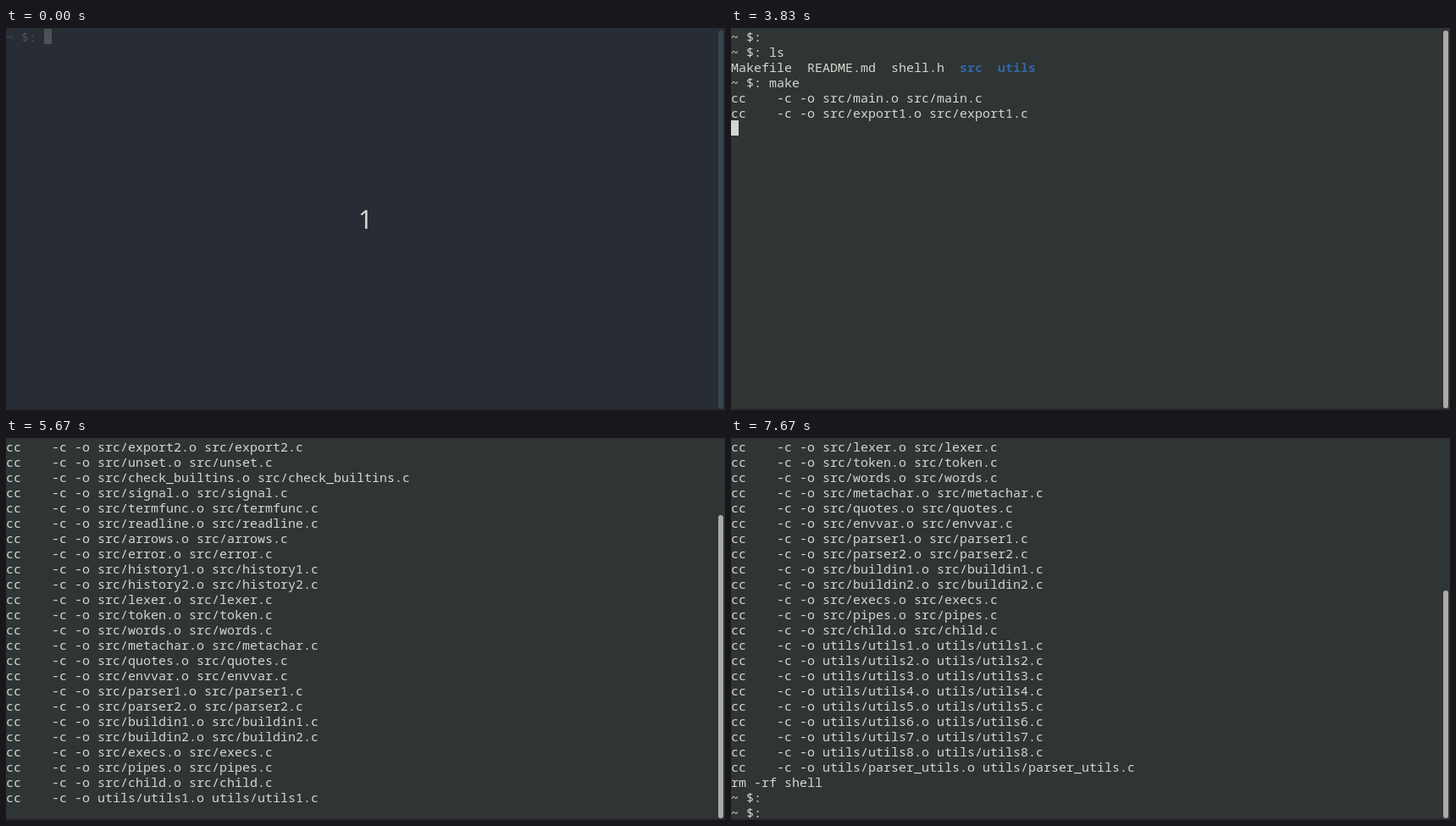
Animation of 849 by 451 pixels, one loop 8 s. Source, as an HTML page:

```html
<!DOCTYPE html>
<html lang="en">
<head>
<meta charset="utf-8">
<title>Terminal: building a shell</title>
<style>
  html, body { margin: 0; width: 100%; height: 100%; overflow: hidden; }
  body {
    --bg: #2e3534; --fg: #d3d7cf; --bar: #aaaaa8;
    position: relative;
    background: linear-gradient(#2c2b2e, #2c2b2e) 0 449px / 100% 2px no-repeat var(--bg);
  }
  body.dim { --bg: #282c34; --fg: #4d5155; --bar: #38464f; }
  #text {
    position: absolute; left: 0; top: 1px; margin: 0;
    font: 15px/18px "Noto Sans Mono", monospace;
    font-variant-ligatures: none;
    color: var(--fg);
  }
  #text b { color: #3465a4; }
  #cursor { position: absolute; left: 0; top: 1px; width: 9px; height: 18px; background: var(--fg); }
  #bar { position: absolute; left: 841px; bottom: 2px; width: 6px; border-radius: 3px; background: var(--bar); }
  #count {
    position: absolute; left: 0; top: 205px; width: 849px;
    font: 30px/41px "Noto Sans", sans-serif;
    text-align: center; color: #d3d7cf; visibility: hidden;
  }
  .dim #count { visibility: visible; }
</style>
</head>
<body class="dim">
<pre id="text"></pre>
<div id="cursor"></div>
<div id="bar"></div>
<div id="count">1</div>
<script>
const LOOP = 8000, ROWS = 25, COL = 9, ROW = 18;
const PROMPT = "~ $: ";
const $ = id => document.getElementById(id);

const files = [
  ..."main export1 export2 unset check_builtins signal termfunc readline arrows error history1 history2 lexer token words metachar quotes envvar parser1 parser2 buildin1 buildin2 execs pipes child"
    .split(" ").map(n => "src/" + n),
  ...Array.from({ length: 8 }, (_, i) => "utils/utils" + (i + 1)),
  "utils/parser_utils"
];

// Terminal output: [time, appended text]
const log = [
  [0, PROMPT],
  [670, "\n"],
  [830, PROMPT],
  [1330, "ls"],
  [1500, "\nMakefile  README.md  shell.h  <b>src</b>  <b>utils</b>\n" + PROMPT],
  [2500, "mak"],
  [2670, "e"],
  [3670, "\n"]
];

// Compiler progress: [time, files done]
let done = 0;
for (const [time, count] of [
  [3830, 2], [4000, 4], [4170, 6], [4330, 9], [4500, 11], [4670, 12],
  [4830, 15], [5000, 18], [5170, 21], [5330, 23], [5500, 24], [5670, 26],
  [5830, 28], [6000, 30], [6170, 33], [6330, 34]
]) {
  const lines = files.slice(done, count).map(f => `cc    -c -o ${f}.o ${f}.c\n`);
  log.push([time, lines.join("")]);
  done = count;
}
log.push([6330, "rm -rf shell\n"], [6500, PROMPT], [7500, "\n" + PROMPT]);

const within = (t, a, b) => t >= a && t < b;
const cursorOff = [[3170, 3670], [4170, 4670], [5500, 6170], [6500, 6670], [7170, 7500], [7670, LOOP]];

let shown = "";
function draw() {
  const t = performance.now() % LOOP;
  const lines = log.filter(e => e[0] <= t).map(e => e[1]).join("").split("\n");
  const view = lines.slice(-ROWS);
  const html = view.join("\n");
  if (html !== shown) $("text").innerHTML = shown = html;

  const x = view[view.length - 1].length * COL;
  const y = (view.length - 1) * ROW;
  $("cursor").style.transform = `translate(${x}px, ${y}px)`;
  $("cursor").style.visibility = cursorOff.some(([a, b]) => within(t, a, b)) ? "hidden" : "visible";

  // The scrollbar reacts to the last Enter before the text does
  const total = Math.max(ROWS, lines.length + within(t, 7170, 7500));
  $("bar").style.top = Math.round(3.4 + 452 * (1 - ROWS / total)) + "px";

  document.body.classList.toggle("dim", t < 500);
  requestAnimationFrame(draw);
}
draw();
</script>
</body>
</html>
```
